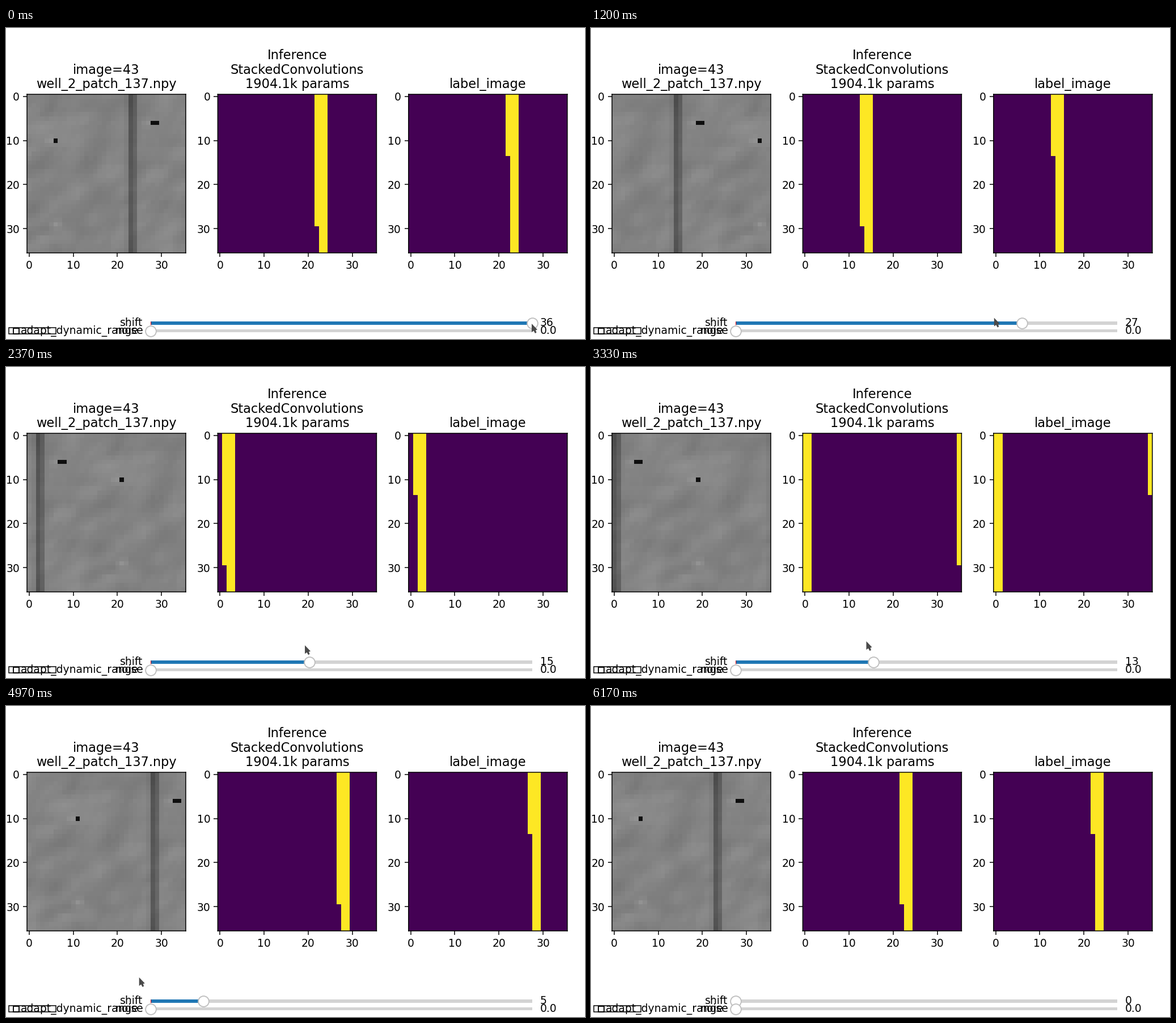
Write a matplotlib script that moves like this. It is 1021 px wide and 549 px high and loops after 6.71 s.

```python
import numpy as np
import matplotlib.pyplot as plt
from matplotlib.animation import FuncAnimation
from matplotlib.patches import Polygon, Rectangle

W, H, DPI = 1021, 549, 128
S = 135 / DPI            # scale of point sizes: the layout is that of a 135 dpi figure
LOOP, STEP = 6710, 22
N = 36                   # cells per image side
PANEL, PITCH = 280, 336.4
TRACK_X, TRACK_W = 255, 673

plt.rcParams.update({
    "font.family": "DejaVu Sans",
    "font.size": 10 * S,
    "axes.linewidth": 0.8 * S,
    "axes.titlepad": 6 * S,
})
for axis in ("xtick", "ytick"):
    plt.rcParams.update({f"{axis}.major.size": 3.5 * S,
                         f"{axis}.major.width": 0.8 * S,
                         f"{axis}.major.pad": 3.5 * S})

# Each drag: start ms, end ms, then the pointer x, y and slider value it reaches
REST = (927, 522, 36)
DRAGS = [
    (230, 830, 769, 518, 31),
    (1070, 1730, 560, 495, 17),
    (1770, 2170, 540, 493, 15),
    (2330, 2470, 503, 488, 15),
    (2670, 3030, 494, 485, 13),
    (3200, 3630, 474, 483, 12),
    (4130, 4400, 440, 480, 10),
    (4400, 5030, 227, 479, 5),
    (5030, 5400, 262, 474, 0),
    (5530, 5770, 168, 334, 0),
    (5930, 6165, 40, -8, 0),
]
ARROW = np.array([(0, 0), (0, 15), (3.5, 12.5), (6, 17), (8.5, 15.5),
                  (7, 11.5), (10, 10.5)])


def pose(t):
    """Pointer x, y and slider value: every drag slows down into its end."""
    now = np.array(REST, float)
    for start, end, *goal in DRAGS:
        left = 1 - np.clip((t - start) / (end - start), 0, 1)
        now += (np.array(goal) - now) * (1 - left ** 1.5)
    return now


def smear(a, dr, dc, reach):
    """Mean of copies rolled along one direction."""
    return np.mean([np.roll(a, (k * dr, k * dc), (0, 1))
                    for k in range(-reach, reach + 1)], axis=0)


def make_patch():
    rng = np.random.default_rng(43)
    tex = smear(smear(rng.normal(size=(N, N)), 1, -1, 1), 0, 1, 2)
    tex = smear(tex, 1, 0, 1)
    img = 131 + 4 * tex / tex.std()
    rows, cols = np.mgrid[:N, :N]
    # dark vertical seam, deeper near the top
    img -= (54 + 4 * np.cos(rows / 5.5)) * np.exp(-((cols - 23.35) / 0.9) ** 2)
    # soft highlights: row, column, gain
    for r, c, gain in ((6, 27, 14), (10, 5, 12), (29, 6, 20), (32, 3, 10)):
        img += gain * np.exp(-(rows - r) ** 2 - ((cols - c) / 1.5) ** 2)
    img[6, 28:30] = img[10, 6] = 14
    return img


def make_mask(rows):
    mask = np.zeros((N, N))
    mask[:, 23:25] = 1
    mask[:rows, 22] = 1
    return mask


def add_panel(k, title, data, cmap, vmax):
    ax = fig.add_axes([(37 + k * PITCH) / W, 1 - (117 + PANEL) / H,
                       PANEL / W, PANEL / H])
    im = ax.imshow(data, cmap=cmap, vmin=0, vmax=vmax,
                   interpolation="nearest", aspect="auto")
    ax.set_xticks(range(0, N, 10))
    ax.set_yticks(range(0, N, 10))
    ax.set_title(title, linespacing=1.12)
    for spine in ax.spines.values():
        spine.set_snap(False)
    return im


def add_slider(y, name, value):
    """Returns the filled bar, the handle and the value text."""
    h = 5.5
    low = y - h / 2
    ui.add_patch(Rectangle((TRACK_X, low), TRACK_W, h, fc="lightgrey", lw=0))
    bar = ui.add_patch(Rectangle((TRACK_X, low), 0, h, fc="#1f77b4", lw=0))
    ui.plot([TRACK_X] * 2, [low, low + h], "r", lw=0.5 * S, solid_capstyle="butt")
    handle, = ui.plot([TRACK_X], [y], "o", ms=10 * S, mfc="white", mec=".75", mew=S)
    ui.text(TRACK_X - 13.5, y, name, ha="right", va="center")
    text = ui.text(TRACK_X + TRACK_W + 13.5, y, value, ha="left", va="center")
    return bar, handle, text


fig = plt.figure(figsize=(W / DPI, H / DPI), dpi=DPI, facecolor="white")

layers = [make_patch(), make_mask(30), make_mask(14)]
images = [
    add_panel(0, "image=43\nwell_2_patch_137.npy", layers[0], "gray", 255),
    add_panel(1, "Inference\nStackedConvolutions\n1904.1k params", layers[1],
              "viridis", 1),
    add_panel(2, "label_image", layers[2], "viridis", 1),
]

ui = fig.add_axes([0, 0, 1, 1], zorder=5)
ui.set(xlim=(0, W), ylim=(H, 0))
ui.axis("off")

# check box
ui.add_patch(Rectangle((5.1, 529), 83, 11.2, fc="none", ec="black", lw=0.8 * S))
ui.plot([17.6], [534.6], "s", ms=5 * S, mfc="none", mec="black", mew=S)
ui.text(25.9, 534.6, "adapt_dynamic_range", ha="left", va="center")

bar, handle, value = add_slider(520.9, "shift", "36")
add_slider(534.7, "noise", "0.0")

arrow = ui.add_patch(Polygon(ARROW, closed=True, fc="#4a4a4a", lw=0, zorder=9))


def update(i):
    t = (i + 0.5) * STEP
    x, y, level = pose(t)
    shift = int(round(level))
    for im, data in zip(images, layers):
        im.set_data(np.roll(data, shift, axis=1))
    length = TRACK_W * shift / N
    bar.set_width(length)
    handle.set_xdata([TRACK_X + length])
    value.set_text(str(shift))
    arrow.set_xy(ARROW + (x, y))
    arrow.set_visible(t < DRAGS[-1][1])
    return [*images, bar, handle, value, arrow]


anim = FuncAnimation(fig, update, frames=LOOP // STEP, interval=STEP,
                     init_func=lambda: update(0), repeat=True, repeat_delay=0)
plt.show()
```
